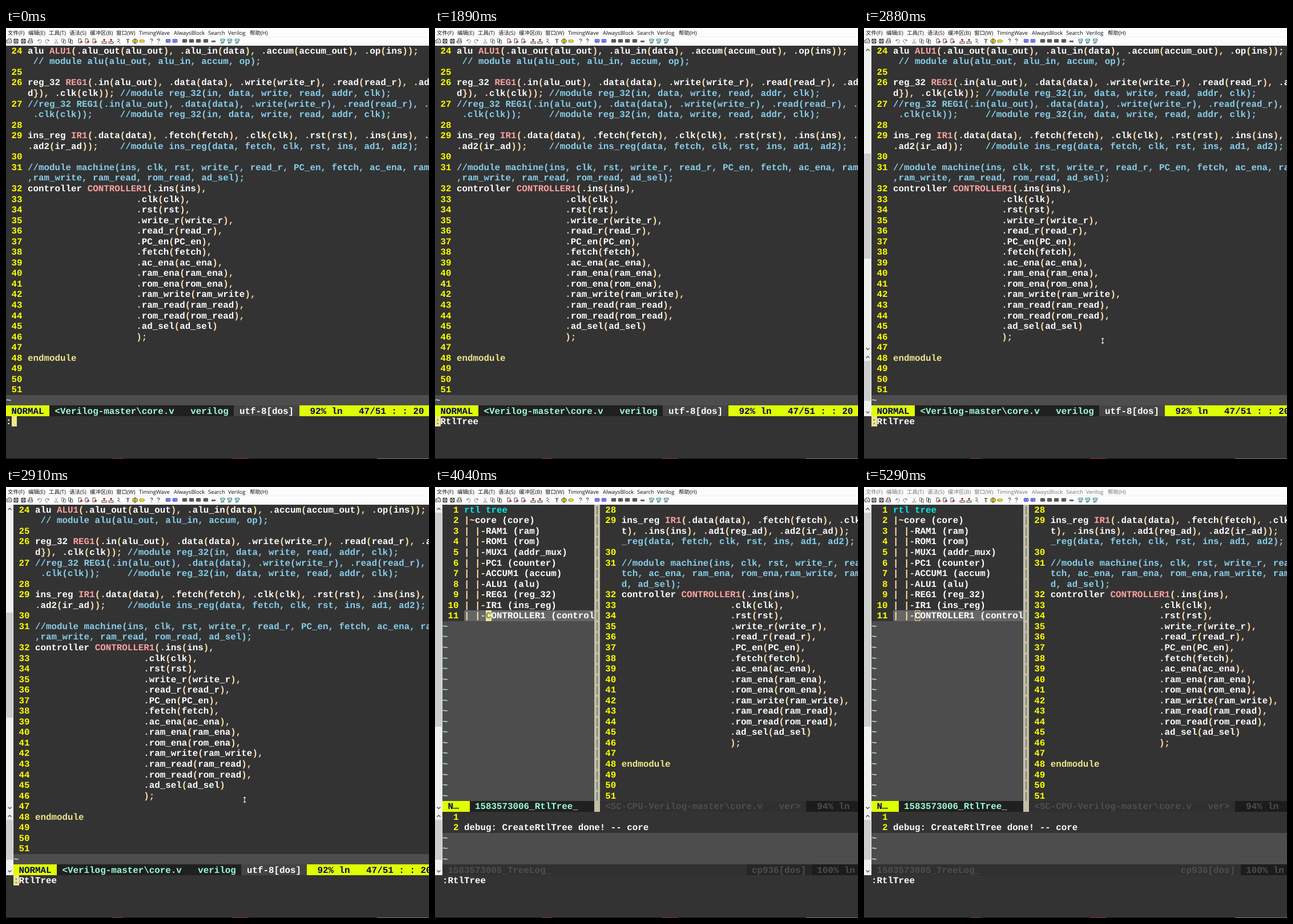
Write an HTML page that moves like this. It is 741x755 px and loops after 5.39 s.

```html
<!DOCTYPE html>
<html lang="zh">
<head>
<meta charset="utf-8">
<title>RtlTree</title>
<style>
html, body { margin: 0; width: 100%; height: 100%; overflow: hidden; background: #333; }
svg { display: block; width: 741px; height: 755px; }
text { white-space: pre; text-rendering: geometricPrecision; }
.mono text { font: bold 15.85px "Liberation Mono", monospace; fill: #fff; }
#menu text { font: 9.5px "Open Sans", "Noto Sans CJK SC", "Noto Sans CJK", sans-serif; }
</style>
</head>
<body>
<svg viewBox="0 0 741 755" xml:space="preserve">
  <rect width="741" height="755" fill="#333"/>
  <g id="single" class="mono"></g>
  <g id="split" class="mono"></g>
  <g id="bars"></g>
  <g id="command" class="mono"></g>
  <rect width="741" height="31" fill="#fcfcfc"/>
  <path d="M0 15.5h741" stroke="#f0f0f0"/>
  <g id="menu"></g>
  <g id="tools"></g>
  <g id="strip"></g>
  <path id="pointer" d="M0-5.5l-2.5 2.5h5zM0 5.5l-2.5-2.5h5zM-.5-3h1v6h-1z" fill="#fff"/>
</svg>
<script>
const LOOP = 5390, CW = 9.51, RH = 18.55, TOP = 30.6, GUTTER = 13;
const C = {
  white: '#fff', comment: '#87ceeb', name: '#ffa0a0', op: '#ffdead', key: '#f0e68c',
  line: '#ff0', tilde: '#add8e6', dim: '#4e4e4e', lime: '#dfff00', navy: '#00005f',
  mint: '#9cffd3', slate: '#708090', empty: '#4d4d4d'
};
const $ = id => document.getElementById(id);
const esc = s => s.replace(/&/g, '&amp;').replace(/</g, '&lt;');
const colX = c => Math.round(c * CW);
const rowY = r => Math.round(TOP + r * RH);
const rect = (x, y, w, h, fill) => `<rect x="${x}" y="${y}" width="${w}" height="${h}" fill="${fill}"/>`;
const span = (s, fill) => `<tspan fill="${fill}">${esc(s)}</tspan>`;
const line = (col, row, spans) => `<text x="${col * CW}" y="${TOP + row * RH + 14.2}">${spans}</text>`;
const put = (col, row, s, fill = C.white) => line(col, row, span(s, fill));
const cells = (col, row, w, fill, h = 1) =>
  rect(colX(col), rowY(row), colX(col + w) - colX(col), rowY(row + h) - rowY(row), fill);
const tildes = (from, count) =>
  Array.from({ length: count }, (_, i) => put(0, from + i, '~', C.tilde)).join('');

// A leading § marks a wrapped row that continues a comment.
function colorize(s) {
  if (s[0] === '§') return span(s.slice(1), C.comment);
  return s.replace(/(\/\/.*)|\b([A-Z][A-Z0-9]+)\b|(endmodule)|([(){}.,;]+)|([\w ]+?(?=\b[A-Z][A-Z0-9]+\b|[(){}.,;\/]|$))/g,
    (all, comment, name, key, op) =>
      span(all, comment ? C.comment : name ? C.name : key ? C.key : op ? C.op : C.white));
}

function code(col, lines) {
  let row = 0, out = '';
  for (const [num, ...parts] of lines) {
    out += put(col + 1, row, String(num), C.line);
    for (const part of parts.length ? parts : ['']) out += line(col + 4, row++, colorize(part));
  }
  return out;
}

const ports = 'clk rst write_r read_r PC_en fetch ac_ena ram_ena rom_ena ram_write ram_read rom_read ad_sel'.split(' ');
const pad = ' '.repeat(20);
const controller = [
  [32, 'controller CONTROLLER1(.ins(ins),'],
  ...ports.map((p, i) => [33 + i, `${pad}.${p}(${p})${p === 'ad_sel' ? '' : ','}`]),
  [46, pad + ');'], [47], [48, 'endmodule'], [49], [50], [51]
];
const wide = [
  [24, 'alu ALU1(.alu_out(alu_out), .alu_in(data), .accum(accum_out), .op(ins));',
    '§ // module alu(alu_out, alu_in, accum, op);'],
  [25],
  [26, 'reg_32 REG1(.in(alu_out), .data(data), .write(write_r), .read(read_r), .ad',
    'd}), .clk(clk)); //module reg_32(in, data, write, read, addr, clk);'],
  [27, '//reg_32 REG1(.in(alu_out), .data(data), .write(write_r), .read(read_r), .',
    '§ .clk(clk));     //module reg_32(in, data, write, read, addr, clk);'],
  [28],
  [29, 'ins_reg IR1(.data(data), .fetch(fetch), .clk(clk), .rst(rst), .ins(ins), .',
    '.ad2(ir_ad));    //module ins_reg(data, fetch, clk, rst, ins, ad1, ad2);'],
  [30],
  [31, '//module machine(ins, clk, rst, write_r, read_r, PC_en, fetch, ac_ena, ram',
    '§,ram_write, ram_read, rom_read, ad_sel);'],
  ...controller
];
const narrow = [
  [28],
  [29, 'ins_reg IR1(.data(data), .fetch(fetch), .clk', 't), .ins(ins), .ad1(reg_ad), .ad2(ir_ad));',
    '§_reg(data, fetch, clk, rst, ins, ad1, ad2);'],
  [30],
  [31, '//module machine(ins, clk, rst, write_r, rea', '§tch, ac_ena, ram_ena, rom_ena,ram_write, ram',
    '§d, ad_sel);'],
  ...controller
];
const tree = ['rtl tree', '|~core (core)',
  ...('RAM1 (ram),ROM1 (rom),MUX1 (addr_mux),PC1 (counter),ACCUM1 (accum),ALU1 (alu),' +
    'REG1 (reg_32),IR1 (ins_reg),CONTROLLER1 (control').split(',').map(s => '| |-' + s)];

$('single').innerHTML = code(0, wide) +
  cells(0, 33, 80, C.empty) + tildes(33, 1) +
  cells(0, 34, 8, C.lime) + cells(8, 34, 34, '#202020') + cells(42, 34, 12, '#444') + cells(54, 34, 26, C.lime) +
  put(1, 34, 'NORMAL', C.navy) +
  put(9, 34, '<Verilog-master\\core.v   verilog', C.mint) +
  put(43, 34, 'utf-8[dos]') + put(56, 34, '92% ln   47/51 : : 20', C.navy);

const treeRow = (s, r) => {
  const [, lead, rest] = s.match(/^([|~ -]*)(.*)$/);
  const branch = [...lead].map(ch => span(ch, ch === '-' ? C.key : C.op)).join('');
  return put(r < 9 ? 2 : 1, r, String(r + 1), C.line) +
    line(4, r, branch + span(rest, r ? C.white : '#00eaea'));
};
$('split').setAttribute('transform', `translate(${GUTTER})`);
$('split').innerHTML =
  cells(4, 10, 24, '#666') + '<g id="treeCursor"></g>' + tree.map(treeRow).join('') + '<g id="treeLetter"></g>' +
  cells(0, 11, 28, C.empty, 17) + tildes(11, 17) +
  cells(28, 0, 1, '#c2bfa5', 29) +
  Array.from({ length: 28 }, (_, r) => put(28, r, '|', '#7f7f7f')).join('') +
  code(29, narrow) +
  cells(0, 28, 5, C.lime) + cells(5, 28, 23, '#202020') +
  put(1, 28, 'N…', C.navy) + put(6, 28, '1583573006_RtlTree_', C.mint) +
  cells(29, 28, 38, '#303030') + cells(67, 28, 10, '#1c1c1c') +
  put(30, 28, '<SC-CPU-Verilog-master\\core.v   ver>', C.dim) + put(69, 28, '94% ln', C.dim) +
  put(2, 29, '1', C.line) + put(2, 30, '2', C.line) +
  put(4, 30, 'debug: CreateRtlTree done! -- core') +
  cells(0, 31, 77, C.empty, 3) + tildes(31, 3) +
  cells(0, 34, 77, '#303030') + '<g id="encoding">' + cells(56, 34, 12, '#262626') + '</g>' +
  cells(68, 34, 9, '#1c1c1c') +
  put(1, 34, '1583573005_TreeLog_', C.dim) + put(57, 34, 'cp936[dos]', C.dim) + put(69, 34, '100% ln', C.dim);

const chevron = (y, d) => `<path d="M3.5 ${y + d}l3 ${-2 * d}l3 ${2 * d}" fill="none" stroke="#505050" stroke-width="1.3"/>`;
$('bars').innerHTML = rect(0, 31, 13, 649, '#f0f0f0') +
  '<rect id="thumb" width="12" fill="#cdcdcd"/>' + rect(0, 583, 12, 70, '#cdcdcd') +
  chevron(38.5, 1.5) + chevron(562, -1.5) + chevron(576.5, 1.5) + chevron(673, -1.5);

$('menu').innerHTML = [[3, '文件(F)'], [39, '编辑(E)'], [75, '工具(T)'], [111, '语法(S)'], [147, '缓冲区(B)'],
  [193, '窗口(W)'], [233, 'TimingWave'], [294, 'AlwaysBlock'], [354, 'Search'], [389, 'Verilog'], [427, '帮助(H)']]
  .map(([x, s]) => `<text x="${x}" y="11.5">${s}</text>`).join('');

const icons = {
  open: 'M-4 3v-5h2l1-2h4v2h1v5zM-2 0h4',
  disk: 'M-3.5-3.5h7v7h-7zM-2-3v2h4v-2M-2 3v-2h4v2',
  printer: 'M-4 0h8v3h-8zM-2 0v-4h5v4',
  undo: 'M-2-3l-1.5 2.5h3M-3 0a3 3 0 1 1 2 3',
  redo: 'M2-3l1.5 2.5h-3M3 0a3 3 0 1 0-2 3',
  cut: 'M-2-4l3.5 6M2-4l-3.5 6M-3 2h2v2h-2zM1 2h2v2h-2z',
  copy: 'M-3.5-4h4v6h-4zM-.5-2h4v6h-4z',
  find: 'M-3-4h4l1 2v5h-5zM0 1h3v2',
  tray: 'M-4 1h8v3h-8zM0-4v4M-2-2l2-2 2 2',
  script: 'M-2-3l2-1 2 2-4 4M0 0l3 4',
  hammer: 'M-3-3h6M0-3v7M-1 0h2',
  tag: 'M-4-2h7l1 2-1 2h-7z',
  dot: 'M0-4a4 4 0 1 0 .1 0zM0-3v6',
  help: 'M-2-2q0-2 2-2t2 2q0 1-2 2v1M0 3v1',
  panel: 'M-3.5-3h7v5h-7zM-2-1h4M-2 1h3',
  letters: 'M-3.5-3.5h7v3h-7zM-2.5 4v-2.5l2 2.5v-2.5M1 4v-2.5h1.5v1'
};
const icon = (x, shape, stroke = '#333', fill = 'none') =>
  `<path transform="translate(${x} 23)" d="${icons[shape]}" stroke="${stroke}" fill="${fill}"/>`;
const series = (xs, ...look) => xs.map(x => icon(x, ...look)).join('');
$('tools').innerHTML = icon(5.5, 'open') + series([17.5, 30.5], 'disk', '#222') + icon(42.5, 'printer') +
  icon(59, 'undo', '#777') + icon(72, 'redo', '#777') + icon(88, 'cut', '#aaa') + icon(101, 'copy', '#777') +
  icon(113, 'copy', '#555') + series([130, 142, 155], 'find', '#444') +
  [130, 142, 155].map(x => rect(x, 23, 4, 2, '#e02020')).join('') +
  series([172, 184], 'tray', '#444') + [172, 184].map(x => rect(x - 1, 19, 2, 4, '#e02020')).join('') +
  icon(197, 'script', '#444') + icon(213.5, 'hammer', '#222') + icon(226, 'dot', '#333', '#f4dc20') +
  icon(238.5, 'tag', '#887700', '#ffe53b') + series([255, 267], 'help', '#222') +
  series([284, 296], 'panel', '#2222b8', '#b8c4ff') + series([313, 325, 337, 350], 'panel', '#333', '#777') +
  rect(360, 22, 7, 3, '#666') + series([379.5, 392, 405], 'letters', '#176b70');

$('strip').innerHTML = rect(0, 754, 650, 1, '#111') + rect(650, 754, 91, 1, '#777') +
  rect(187, 754, 18, 1, '#a22') + rect(397, 754, 28, 1, '#a22');

// Each step: start time, then the state that holds until the next one.
const typing = [[0, '', 1], [240, 'R', 2], [780, 'Rt', 3], [1330, 'RtlTree', 8], [1890, 'RtlTree', 0], [3010, 'RtlTree', -1]];
const layouts = [[0, 'plain'], [2880, 'shifted'], [3010, 'split']];
const blinks = [[0, 'block'], [3700, 'off'], [3920, 'block'], [4300, 'off'], [4540, 'block'], [4920, 'off'], [5190, 'block'], [5290, 'outline']];
const moves = [[0], [2010, 427, 564], [2070], [2410, 423.5, 555.5], [2650, 422, 553], [2690, 420, 550.5], [2740, 418, 548],
  [3740, 424, 562], [3790, 440, 600], [3840, 462, 650], [3890, 482, 692], [3940, 492, 710], [3990],
  [4130, 430, 620], [4180, 380, 545], [4220, 349, 500], [4270]];
const at = (steps, t) => steps.findLast(s => s[0] <= t);
const show = (el, on) => el.setAttribute('visibility', on ? 'visible' : 'hidden');

let last = '';
function render(t) {
  const [, typed, col] = at(typing, t), [, layout] = at(layouts, t), [, blink] = at(blinks, t), [, px, py] = at(moves, t);
  const key = [typed, col, layout, blink, px, py].join();
  if (key === last) return;
  last = key;
  const split = layout === 'split', shift = layout === 'plain' ? 0 : GUTTER, away = blink === 'outline';
  for (const id of ['single', 'command']) $(id).setAttribute('transform', `translate(${shift})`);
  $('single').style.display = split ? 'none' : '';
  $('split').style.display = split ? '' : 'none';
  $('bars').style.display = shift ? '' : 'none';
  $('thumb').setAttribute('y', split ? 45 : 220);
  $('thumb').setAttribute('height', split ? 375 : 184);
  $('command').innerHTML = (col < 0 ? '' : cells(col, 35, 1, C.key)) +
    line(0, 35, span(':', col === 0 ? C.slate : C.white) + span(typed, C.white));
  const x = colX(8), y = rowY(10);
  $('treeCursor').innerHTML = away
    ? `<rect x="${x + .5}" y="${y + .5}" width="${CW - 1}" height="${RH - 1}" fill="none" stroke="${C.key}"/>` : '';
  $('treeLetter').innerHTML = blink === 'block' ? cells(8, 10, 1, C.key) + put(8, 10, 'C', C.slate) : '';
  show($('encoding'), split && !away);
  $('menu').setAttribute('fill', away ? '#777' : '#111');
  show($('pointer'), px !== undefined);
  if (px !== undefined) $('pointer').setAttribute('transform', `translate(${px} ${py})`);
}
const start = performance.now();
function tick() {
  render((performance.now() - start) % LOOP);
  requestAnimationFrame(tick);
}
tick();
</script>
</body>
</html>
```
